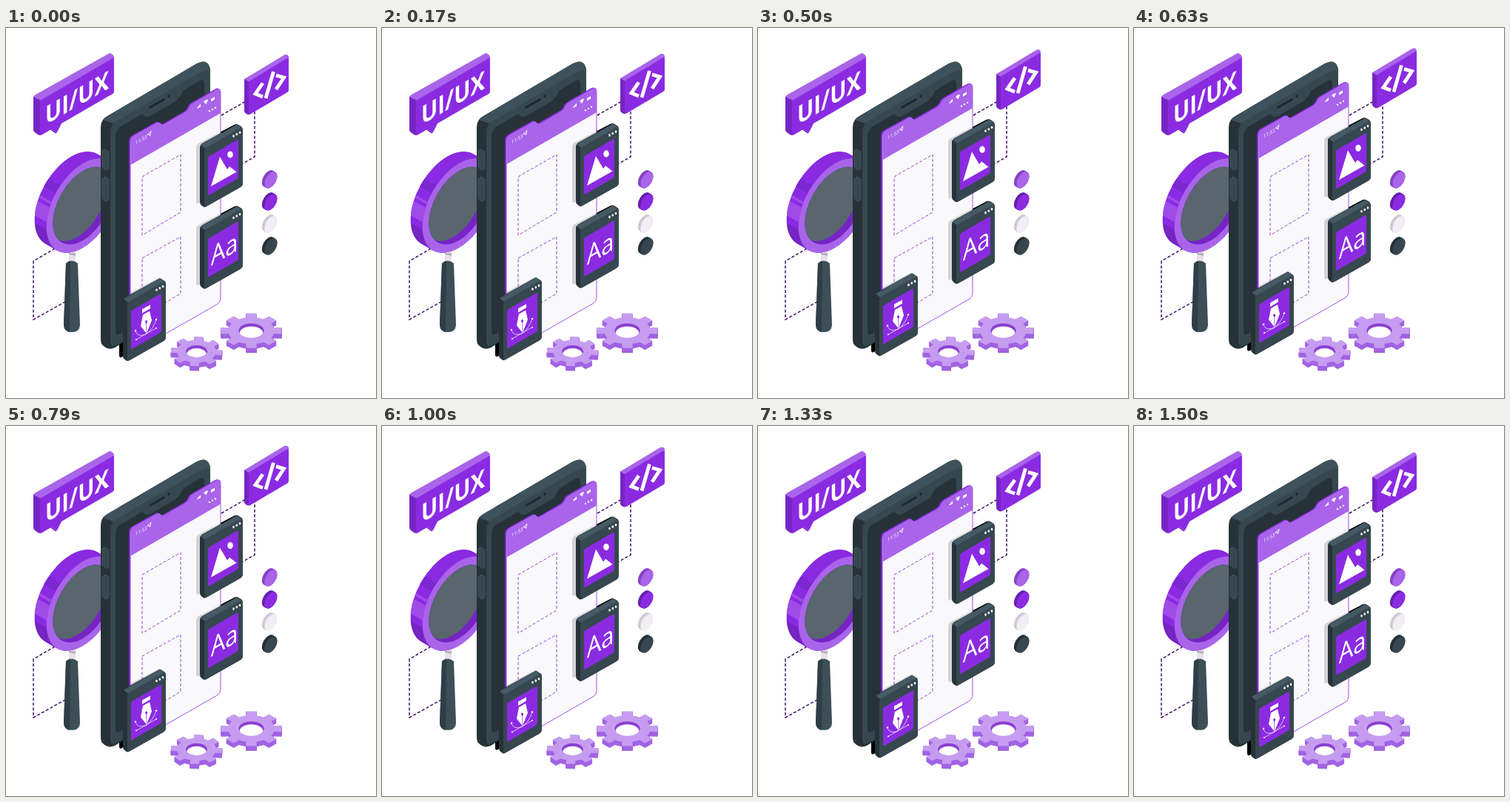
An HTML page for the animation above (1540 ms loop, 500 px wide and 500 px high).

```html
<!DOCTYPE html>
<html lang="en">
<head>
<meta charset="utf-8">
<title>UI/UX</title>
<style>
html, body { margin: 0; width: 100%; height: 100%; overflow: hidden; background: #fff; }
svg { display: block; width: 100vw; height: 100vh; }
text { font-family: "Open Sans", "Noto Sans", sans-serif; fill: #fff; }
.main { fill: #8a2be2; }
.light { fill: #a964ea; }
.deep { fill: #7624c4; }
.white { fill: #fff; }
.slate { fill: #37474f; }
.dark { fill: #263238; }
.line { fill: none; stroke: #fff; }
.dash { fill: none; stroke: #8f3fd8; stroke-width: 1; stroke-dasharray: 4 2.6; }
.dash.bold { stroke: #3c1266; stroke-width: 1.5; }
</style>
</head>
<body>
<svg viewBox="0 0 500 500">
  <defs>
    <path id="sheet" d="M168 154Q168 148.500 172 146L204 128Q207 126.500 208.500 129Q210 132 214 130L241 114.500Q246 111.500 248 106.500Q249 103.500 252 102L284 83.500Q290 80 290 87.500V364Q290 370.500 285 373.500L174 437Q168 440 168 434Z"/>
    <clipPath id="onSheet"><use href="#sheet"/></clipPath>
    <clipPath id="hole"><circle r="47"/></clipPath>
    <path id="shade" d="M257 161Q257 157 260 155L309 129.500Q312 128 316 131L319 133V204L260 236Q257 237 257 233Z"/>
    <g id="card">
      <path class="dark" d="M262 160Q262 157 265 155L312 129L319 133.500L320 209Q320 212 317 214L271 240Q268 242 266 240L264 238.500Q262 237 262 234Z"/>
      <path fill="#455a64" d="M263 157L312 129.500L319 133.500L269 162Z"/>
      <path class="slate" d="M268 165Q268 162 271 160.500L317 134Q320 132.500 320 136V209Q320 212 317 214L271 240Q268 241 268 238Z"/>
      <path class="main" d="M273 175Q273 173 275 172L312 150.500Q314 149.500 314 152V200Q314 202 312 203L275 224.500Q273 225.500 273 223Z"/>
      <g class="white"><ellipse cx="307.500" cy="145" rx="1.300" ry="1.800"/><ellipse cx="311.800" cy="142.600" rx="1.300" ry="1.800"/><ellipse cx="316" cy="140.200" rx="1.300" ry="1.800"/></g>
    </g>
  </defs>

  <!-- speech bubble -->
  <path class="light" d="M37 93Q38 91 40 90L138 35Q141 33 143 35L146 38V60L47 110L37 104Z"/>
  <path class="deep" d="M37 93L47 98V145Q45 145 43 144L39 141Q37 140 37 136Z"/>
  <path class="main" d="M46 100Q46 98 48 97L143 41.500Q146 39.500 146 42V86Q146 88 144 89L75 129L69 141L61 137L49 144Q46 146 46 142Z"/>
  <path class="deep" d="M61 137L69 141L67 142.500L60 137.500Z"/>
  <text transform="matrix(.866 -.5 0 1 53 131)" font-size="34" font-weight="700">UI/UX</text>

  <!-- magnifier -->
  <path class="dash bold" d="M66 298L37 315V394L80 370"/>
  <path fill="#e6e1e9" d="M85 299H94V320H85Z"/>
  <path fill="#b9b3bd" d="M85 304H94V308L85 306Z"/>
  <g id="lens"></g>
  <path fill="#3d4e57" d="M81 318Q89 311 97 318L100 402Q99 411 89 411Q79 411 78 402Z"/>
  <path fill="#2f3e46" d="M81 318Q84 315 87 314.500L86 411Q79 410 78 402Z"/>

  <g class="float"><g class="shades"></g></g>

  <!-- phone -->
  <path class="dark" d="M128 134Q128 124 137 119L258 48Q269 42 274 50Q276 53 276 58V350L147 432Q138 436 131 429Q128 427 128 420Z"/>
  <path fill="#3f525b" d="M131 124Q133 121 137 119L258 48Q269 42 274 50L276 60L264 60L145 129Z"/>
  <path class="slate" d="M141 141Q141 131 149 126L264 59Q276 53 276 64V352L150 428Q141 433 141 424Z"/>
  <path class="dark" d="M148 411V148Q148 137 155 133L184 116Q189 122 195 119L229 99Q236 94 239 85L260 72Q268 67 268 76V340L154 413Q148 416 148 411Z"/>
  <path d="M194.500 107.500L213.500 96.500" stroke="#1f292e" stroke-width="3" stroke-linecap="round"/>
  <ellipse cx="220" cy="92" rx="1.700" ry="2.200" fill="#1f292e"/>
  <g fill="#37474f" stroke="#455a64" stroke-width=".8">
    <path d="M130 166Q134 161 139 168V189Q137 195 132 190L130 188Z"/>
    <path d="M130 204Q134 198 139 205V230Q137 237 132 232L130 230Z"/>
  </g>

  <!-- floating screen -->
  <g class="float">
    <use href="#sheet" class="main" x="-1.800" y="-.8"/>
    <use href="#sheet" fill="#f9f8fa" stroke="#8a2be2" stroke-width=".8"/>
    <g clip-path="url(#onSheet)">
      <path class="light" d="M168.500 70H290V115L168.500 185Z"/>
      <g class="shades" opacity=".15"></g>
    </g>
    <text transform="matrix(.866 -.5 0 1 175 158)" font-size="7">11:53</text>
    <path class="line" d="M191 144.500L196 139.500L194.500 146L193.500 143.500Z" stroke-width=".9"/>
    <g class="white">
      <path d="M258.500 109V107.500L263 102.500V106.500Z"/>
      <path d="M267 100Q270 96 273 97L270.500 103Z"/>
      <path d="M277 96L282 93V96.500L277 99.500Z"/>
      <circle cx="275" cy="112.300" r="1.200"/><circle cx="279" cy="110" r="1.200"/><circle cx="283" cy="107.700" r="1.200"/>
    </g>
  </g>

  <g class="dash">
    <path d="M184 201L236 171V249L184 280Z"/>
    <path d="M184 311L236 282V359L184 390Z"/>
  </g>
  <path class="dash bold" d="M291 118L336 92V174L319 184"/>

  <!-- floating tiles -->
  <g class="float">
    <path class="light" d="M322 69L376 36.500Q379 35 381 37L382 39V60L329 90L322 80Z"/>
    <path class="deep" d="M322 69L329 73V117Q326 117 324 115.500L322 113Z"/>
    <path class="main" d="M328 74Q328 72 330 71L379 41.500Q382 39.500 382 42V84Q382 86 380 87L331 116Q328 118 328 114Z"/>
    <path class="line" stroke-width="4.800" d="M347 74.500L337 89L347 93M351 95L361.500 59M365 64L375.500 67L365 83"/>

    <g transform="translate(0 1)">
      <use href="#card"/>
      <path class="white" d="M277 213L289 173L299 190L302 186L311.500 193.500Z"/>
      <ellipse class="white" cx="303" cy="170" rx="3.800" ry="4.600"/>
    </g>

    <g transform="translate(0 111.500)">
      <use href="#card"/>
      <text transform="matrix(.866 -.5 0 1 276.800 210)" font-size="35.500">Aa</text>
    </g>

    <g transform="translate(-104 209)">
      <use href="#card"/>
      <path class="white" d="M288 171L299 165V170L288 176.500ZM289 178.500L298 173.500L301 186L294 204L286 194Z"/>
      <path class="main" d="M293.200 188H294L294.300 203H293.700Z"/>
      <ellipse class="main" cx="293.600" cy="188" rx="1.500" ry="2"/>
      <path class="line" stroke-width=".7" d="M279 201Q282 209 293 205Q303 198 307 185M280 212L307 196.500"/>
      <g class="white"><circle cx="279" cy="200" r="1.200"/><circle cx="307" cy="185" r="1.200"/><circle cx="280" cy="212" r="1"/><circle cx="307" cy="196.500" r="1"/></g>
    </g>
  </g>

  <g id="coins"></g>
  <g id="gears"></g>
</svg>

<script>
const $ = s => document.querySelector(s);
const all = s => [...document.querySelectorAll(s)];
const disc = (x, y, r, fill) =>
  `<circle r="${r}" fill="${fill}" transform="matrix(.866 -.5 0 1 ${x} ${y})"/>`;

// Stack discs along the depth axis to form a solid rim
function solid(x, y, r, fill, depth) {
  let out = "";
  for (let d = depth; d > 0; d -= 0.5) out += disc(x - d, y - d * 0.577, r, fill);
  return out;
}

function lens() {
  const x = 104, y = 240, r = 57, depth = 16;
  // Strip of the rim between two angles, from back edge to front edge
  const strip = (a, b, color) => {
    const back = [], front = [];
    for (let i = 0; i <= 8; i++) {
      const q = (a + (b - a) * i / 8) * Math.PI / 180;
      const px = x + 0.866 * r * Math.cos(q), py = y + r * (Math.sin(q) - 0.5 * Math.cos(q));
      back.push(`${px - depth} ${py - depth * 0.577}`);
      front.unshift(`${px} ${py}`);
    }
    return `<path fill="${color}" d="M${back.concat(front).join("L")}Z"/>`;
  };
  return solid(x, y, r, "#8a2be2", depth) +
    strip(90, 176, "#7624c4") + strip(186, 204, "#a04be8") +
    strip(208, 211, "#a04be8") + strip(222, 232, "#7c27cf") +
    disc(x, y, r, "#a964ea") + disc(x, y, 47, "#7624c4") +
    `<g transform="matrix(.866 -.5 0 1 ${x} ${y})"><g clip-path="url(#hole)">
      <circle cx="-9" cy="-9" r="47" fill="#59666d"/></g></g>`;
}

function gear(x, y, r, turn) {
  const pts = [];
  for (let i = 0; i < 8; i++) {
    for (const [a, k] of [[-13, 0.76], [-10, 1], [10, 1], [13, 0.76], [22.5, 0.76]]) {
      const q = (i * 45 + a + turn) * Math.PI / 180;
      pts.push(`${(r * k * Math.cos(q)).toFixed(1)},${(r * k * 0.577 * Math.sin(q)).toFixed(1)}`);
    }
  }
  const face = (dy, fill) => `<polygon points="${pts.join(" ")}" fill="${fill}" transform="translate(0 ${dy})"/>`;
  const rx = r * 0.41, ry = rx * 0.577, id = "bore" + r;
  let out = `<g transform="translate(${x} ${y})">`;
  for (let d = 6.5; d > 0; d -= 0.5) out += face(d, "#a163e2");
  return out + face(0, "#c69cf1") +
    `<clipPath id="${id}"><ellipse rx="${rx}" ry="${ry}"/></clipPath>
    <ellipse rx="${rx}" ry="${ry}" fill="#8a3fd2"/>
    <ellipse cy="4" rx="${rx - 1}" ry="${ry}" fill="#fff" clip-path="url(#${id})"/></g>`;
}

$("#lens").innerHTML = lens();
$("#coins").innerHTML = [["#a964ea", "#8740c6"], ["#8a2be2", "#6a1fae"], ["#f3eef5", "#d0c8d4"], ["#37474f", "#263238"]]
  .map(([face, side], i) => solid(358, 205.5 + i * 30, 10, side, 3.5) + disc(358, 205.5 + i * 30, 10, face)).join("");
$("#gears").innerHTML = gear(257.5, 437, 35, 5) + gear(331.5, 409, 41.5, 0);
for (const g of all(".shades"))
  g.innerHTML = [[0, 1], [0, 111.5], [-104, 209]].map(([x, y]) => `<use href="#shade" x="${x}" y="${y}"/>`).join("");

const LOOP = 1540, LIFT = 9.4;
const floats = all(".float");
const start = performance.now();
function draw(now) {
  const phase = (Math.max(0, now - start) % LOOP) / LOOP;
  const y = -LIFT * (1 - Math.cos(phase * 2 * Math.PI)) / 2;
  for (const g of floats) g.setAttribute("transform", `translate(0 ${y.toFixed(2)})`);
  requestAnimationFrame(draw);
}
draw(start);
</script>
</body>
</html>
```
